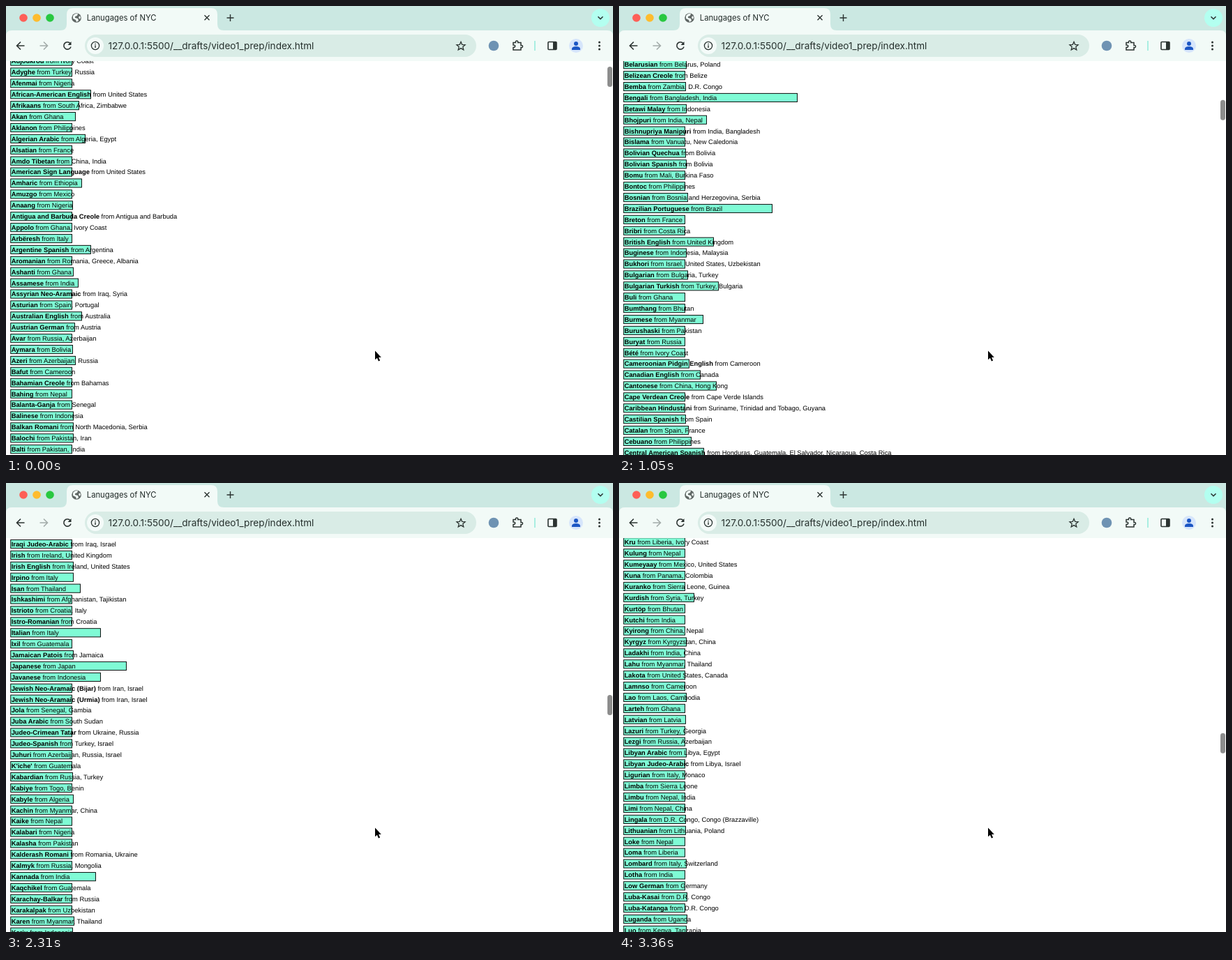
Recreate the animation shown at these times as an HTML page. Size 870x644 px, loop 3.43 s.

```html
<!DOCTYPE html>
<html lang="en">
<head>
<meta charset="utf-8">
<title>Lanugages of NYC</title>
<style>
html, body { margin: 0; width: 100%; height: 100%; overflow: hidden; background: #fff; }
svg { position: absolute; left: 0; top: 0; font-family: Inter, sans-serif; }
#list { font: 10px "Liberation Sans", Arial, sans-serif; text-rendering: geometricPrecision; }
#list rect { fill: #7ffbd5; stroke: #000; }
.line { fill: none; stroke: #2b3331; stroke-width: 1.6; }
</style>
</head>
<body>
<svg width="870" height="644" viewBox="0 0 870 644">
  <g id="list"></g>
  <rect id="thumb" x="862" width="7" height="29" rx="3.5" fill="#8d8d8d"/>
  <path fill="#cbe8e2" d="M0 0H870V44H0z"/>
  <path fill="#f2faf7" d="M0 79V43Q0 35 8 35H78Q87 35 87 26V12Q87 3 96 3H294Q303 3 303 12V26Q303 35 312 35H862Q870 35 870 43V79z"/>
  <circle cx="25" cy="17" r="5.8" fill="#fe5f57"/>
  <circle cx="44" cy="17" r="5.8" fill="#febc2e"/>
  <circle cx="63" cy="17" r="5.8" fill="#28c840"/>
  <!-- tab -->
  <circle cx="101" cy="17" r="6.8" fill="#5f6664"/>
  <path fill="#f2faf7" d="M96 14q3-4 7-3l-1 3-3 1 0 2 4 1 1 3-3 2-1-3-4-2zM105 14l2 2-1 3-2-2z"/>
  <text x="115.8" y="21" font-size="11.25" fill="#202927">Lanugages of NYC</text>
  <path class="line" d="M284.5 13.2l7 7m0-7l-7 7M321.5 12v10m-5-5h10" style="stroke-width:1.4"/>
  <circle cx="852" cy="17" r="13" fill="#b3fff0"/>
  <path class="line" d="M848.5 15.2l3.5 3.5 3.5-3.5"/>
  <!-- toolbar -->
  <path class="line" d="M26.5 57H15.5m5.5-5.5L15.5 57l5.5 5.5"/>
  <path class="line" d="M48.5 57h11m-5.5-5.5l5.5 5.5-5.5 5.5" style="stroke:#a3acaa"/>
  <path class="line" d="M92 53.5a5.2 5.2 0 1 0 1 5"/>
  <path fill="#2b3331" d="M93.5 51v5h-5z"/>
  <rect x="113" y="41" width="561" height="32" rx="16" fill="#d9ece6"/>
  <circle cx="128" cy="57" r="12" fill="#f4fbf9"/>
  <circle class="line" cx="128" cy="57" r="5.6" style="stroke-width:1.3"/>
  <path class="line" d="M128 56.3v3.7m0-6.2v1.5" style="stroke-width:1.4"/>
  <text x="146.5" y="61.7" font-size="13.55" fill="#26302d">127.0.0.1:5500/__drafts/video1_prep/index.html</text>
  <path class="line" d="M652 51.3l1.7 4 4.4.4-3.3 2.9 1 4.3-3.8-2.3-3.8 2.3 1-4.3-3.3-2.9 4.4-.4z" style="stroke-width:1.3"/>
  <circle cx="699" cy="57" r="7.3" fill="#6f93b3"/>
  <path class="line" d="M727 52.5h3.5q-.5-2.5 1.6-2.5t1.6 2.5h4.3v4q2.5-.4 2.5 1.6t-2.5 1.5v3.4h-11v-3.6q2.8 0 2.8-1.8t-2.8-1.7z" style="stroke-width:1.5"/>
  <path fill="#a9eee2" d="M757 50h2v14h-2z"/>
  <rect class="line" x="777" y="51.5" width="12" height="11" rx="1"/>
  <path fill="#2b3331" d="M784 51h5v12h-5z"/>
  <circle cx="817" cy="57" r="10" fill="#d6e5fb"/>
  <circle cx="817" cy="54" r="3" fill="#1b56c4"/>
  <path fill="#1b56c4" d="M811 63v-1.5q0-3.5 6-3.5t6 3.5V63z"/>
  <g fill="#2b3331"><circle cx="850.5" cy="52" r="1.5"/><circle cx="850.5" cy="57" r="1.5"/><circle cx="850.5" cy="62" r="1.5"/></g>
  <!-- pointer -->
  <path d="M529 494.5V507.300l2.900-2.600 2 4.800 2.200-.9-2-4.700h3.700z" stroke="#fff" stroke-width="1.600" paint-order="stroke" stroke-linejoin="round"/>
</svg>
<script>
// language : countries : extra bar length
const rows = `Adjoukrou:Ivory Coast
Adyghe:Turkey, Russia
Afenmai:Nigeria
African-American English:United States:27
Afrikaans:South Africa, Zimbabwe:10
Akan:Ghana:5
Aklanon:Philippines
Algerian Arabic:Algeria, Egypt:19
Alsatian:France
Amdo Tibetan:China, India
American Sign Language:United States
Amharic:Ethiopia:14
Amuzgo:Mexico
Anaang:Nigeria:1
Antigua and Barbuda Creole:Antigua and Barbuda
Appolo:Ghana, Ivory Coast
Arbëresh:Italy
Argentine Spanish:Argentina:27
Aromanian:Romania, Greece, Albania
Ashanti:Ghana:2
Assamese:India:9
Assyrian Neo-Aramaic:Iraq, Syria
Asturian:Spain, Portugal
Australian English:Australia:14
Austrian German:Austria:4
Avar:Russia, Azerbaijan
Aymara:Bolivia:1
Azeri:Azerbaijan, Russia:5
Bafut:Cameroon
Bahamian Creole:Bahamas
Bahing:Nepal
Balanta-Ganja:Senegal
Balinese:Indonesia:2
Balkan Romani:North Macedonia, Serbia:2
Balochi:Pakistan, Iran:2
Balti:Pakistan, India
Bambara:Mali, Ivory Coast:8
Banguingui:Philippines, Malaysia
Banjarese:Indonesia, Malaysia:2
Bantawa:Nepal, India
Baoulé:Ivory Coast:2
Baragaun:Nepal
Barbadian Creole:Barbados
Bartangi:Tajikistan, Afghanistan
Basaa:Cameroon
Basque:Spain, France
Bassa:Liberia, Sierra Leone
Batak:Indonesia:1
Bats:Georgia
Bavarian:Germany, Austria
Bedawi:Sudan, Egypt
Beja:Sudan
Belarusian:Belarus, Poland:2
Belizean Creole:Belize
Bemba:Zambia, D.R. Congo:1
Bengali:Bangladesh, India:161
Betawi Malay:Indonesia:2
Bhojpuri:India, Nepal:31
Bishnupriya Manipuri:India, Bangladesh
Bislama:Vanuatu, New Caledonia
Bolivian Quechua:Bolivia:1
Bolivian Spanish:Bolivia:2
Bomu:Mali, Burkina Faso
Bontoc:Philippines
Bosnian:Bosnia and Herzegovina, Serbia:4
Brazilian Portuguese:Brazil:125
Breton:France
Bribri:Costa Rica
British English:United Kingdom:41
Buginese:Indonesia, Malaysia:2
Bukhori:Israel, United States, Uzbekistan
Bulgarian:Bulgaria, Turkey:4
Bulgarian Turkish:Turkey, Bulgaria:48
Buli:Ghana
Bumthang:Bhutan
Burmese:Myanmar:26
Burushaski:Pakistan
Buryat:Russia
Bété:Ivory Coast
Cameroonian Pidgin English:Cameroon:6
Canadian English:Canada:22
Cantonese:China, Hong Kong:45
Cape Verdean Creole:Cape Verde Islands
Caribbean Hindustani:Suriname, Trinidad and Tobago, Guyana
Castilian Spanish:Spain:1
Catalan:Spain, France:5
Cebuano:Philippines:9
Central American Spanish:Honduras, Guatemala, El Salvador, Nicaragua, Costa Rica:27
Central Kurdish:Iraq, Iran
Chadian Arabic:Chad
Chakma:Bangladesh, India
Chaldean Neo-Aramaic:Iraq
Chamorro:Guam
Chantyal:Nepal
Chatino:Mexico
Chavacano:Philippines
Chechen:Russia
Cherokee:United States
Chichewa:Malawi, Zambia
Chilean Spanish:Chile:5
Chinantec:Mexico
Chittagonian:Bangladesh
Choctaw:United States
Chocho:Mexico
Chuj:Guatemala
Chukchi:Russia
Chuukese:Micronesia
Chuvash:Russia
Cilentan:Italy
Cimbrian:Italy
Colombian Spanish:Colombia:30
Comorian:Comoros
Cornish:United Kingdom
Corsican:France
Costa Rican Spanish:Costa Rica
Cree:Canada
Creek:United States
Crimean Karaim:Ukraine
Crimean Tatar:Ukraine, Turkey, Uzbekistan
Croatian:Croatia, Slovenia:4
Cuban Spanish:Cuba:6
Cuicatec:Mexico
Cypriot Greek:Cyprus, Greece
Czech:Czech Republic, Slovakia:7
Dagaare:Ghana
Dagbani:Ghana
Dangme:Ghana
Danish:Denmark, Sweden:2
Danube Swabian:Hungary, Romania
Darfurian Arabic:Sudan:5
Dari:Afghanistan, Pakistan:4
Denjongke:India
Dhivehi:Maldives, India
Dinka:Sudan, South Sudan
Dolpo:Nepal
Dominican Creole (English):Dominica
Dominican Creole (French):Dominica
Dominican Spanish:Dominican Republic:5
Duala:Cameroon
Dungan:Kyrgyzstan, Kazakhstan
Dutch:Netherlands, Belgium:14
Dyula:Ivory Coast, Burkina Faso:8
Dzongkha:Bhutan, India
Eastern Armenian:Armenia, Russia:2
Ebrié:Ivory Coast
Ecuadorian Kichwa:Ecuador
Ecuadorian Spanish:Ecuador:10
Edo:Nigeria:1
Efik:Nigeria:1
Egyptian Arabic:Egypt:39
Esan:Nigeria
Esperanto:France, Brazil:1
Estonian:Estonia
Ewe:Ghana, Togo:2
Ewondo:Cameroon
Extremaduran:Spain
Fang:Gabon, Cameroon
Fante:Ghana
Faroese:Denmark
Fijian:Fiji
Fiji Hindi:Fiji
Finnish:Finland
Flemish:Belgium
Fon:Benin, Togo
French:France, Canada:60
Frisian:Netherlands
Friulian:Italy
Fulani:Guinea, Senegal:9
Fur:Sudan
Fuzhounese:China:40
Ga:Ghana
Gagauz:Moldova
Galician:Spain
Gallurese:Italy
Gan:China
Garhwali:India
Garifuna:Honduras, Belize, Guatemala
Garo:India, Bangladesh
Gen:Togo, Benin
Georgian:Georgia:5
German:Germany, Austria:30
Ghale:Nepal
Gheg Albanian:Kosovo, Albania
Gikuyu:Kenya
Gilaki:Iran
Gola:Liberia
Gonja:Ghana
Gorani:Kosovo
Gouro:Ivory Coast
Grebo:Liberia
Greek:Greece, Cyprus:30
Greenlandic:Denmark
Grenadian Creole:Grenada
Griko:Italy
Guadeloupean Creole:France
Guarani:Paraguay
Guerrero Nahuatl:Mexico
Gujarati:India:40
Gullah:United States
Gurage:Ethiopia
Gurung:Nepal
Gusii:Kenya
Guyanese Creole:Guyana:20
Gyalrong:China
Hadiyya:Ethiopia
Haitian Creole:Haiti:80
Hakha Chin:Myanmar
Hakka:China, Taiwan:8
Harari:Ethiopia
Hassaniya:Mauritania
Hausa:Nigeria, Niger:4
Hawaiian:United States
Hazaragi:Afghanistan
Hebrew:Israel:50
Herero:Namibia
Hiligaynon:Philippines
Hindi:India:90
Hindko:Pakistan
Hmong:Laos, China
Ho:India
Honduran Spanish:Honduras
Hopi:United States
Huave:Mexico
Hungarian:Hungary, Romania:8
Hunsrik:Brazil
Hutsul:Ukraine
Ibanag:Philippines
Ibibio:Nigeria
Icelandic:Iceland
Igbo:Nigeria:12
Ilocano:Philippines
Indonesian:Indonesia:6
Ingush:Russia
Inuktitut:Canada
Iranian Azeri:Iran
Iraqi Judeo-Arabic:Iraq, Israel
Irish:Ireland, United Kingdom
Irish English:Ireland, United States:2
Irpino:Italy:2
Isan:Thailand:12
Ishkashimi:Afghanistan, Tajikistan
Istrioto:Croatia, Italy
Istro-Romanian:Croatia
Italian:Italy:41
Ixil:Guatemala
Jamaican Patois:Jamaica:2
Japanese:Japan:78
Javanese:Indonesia:41
Jewish Neo-Aramaic (Bijar):Iran, Israel
Jewish Neo-Aramaic (Urmia):Iran, Israel
Jola:Senegal, Gambia
Juba Arabic:South Sudan
Judeo-Crimean Tatar:Ukraine, Russia
Judeo-Spanish:Turkey, Israel
Juhuri:Azerbaijan, Russia, Israel
K'iche':Guatemala
Kabardian:Russia, Turkey:1
Kabiye:Togo, Benin
Kabyle:Algeria:2
Kachin:Myanmar, China
Kaike:Nepal
Kalabari:Nigeria
Kalasha:Pakistan
Kalderash Romani:Romania, Ukraine
Kalmyk:Russia, Mongolia
Kannada:India:34
Kaqchikel:Guatemala
Karachay-Balkar:Russia
Karakalpak:Uzbekistan
Karen:Myanmar, Thailand:3
Kariu:Indonesia:1
Kashmiri:India, Pakistan:3
Kassonke:Mali, Senegal
Kazakh:Kazakhstan, China:5
Khaling:Nepal
Khalkha Mongolian:Mongolia, Russia:1
Kham Magar:Nepal
Kham Tibetan:China, India
Khmer:Cambodia, Vietnam:10
Khowar:Pakistan, India
Kikongo:D.R. Congo, Congo (Brazzaville):3
Kimbundu:Angola:1
Kinaray-a:Philippines
Kinyarwanda:Rwanda, Uganda:6
Kirundi:Burundi:5
Kituba:Congo (Brazzaville):2
Kodava:India
Konkani:India:2
Konyak:India
Korean:South Korea:150
Koya:India
Kpelle:Liberia, Guinea
Krahn:Liberia, Ivory Coast
Krio:Sierra Leone
Kru:Liberia, Ivory Coast
Kulung:Nepal
Kumeyaay:Mexico, United States
Kuna:Panama, Colombia
Kuranko:Sierra Leone, Guinea
Kurdish:Syria, Turkey:13
Kurtöp:Bhutan
Kutchi:India
Kyirong:China, Nepal
Kyrgyz:Kyrgyzstan, China:2
Ladakhi:India, China
Lahu:Myanmar, Thailand
Lakota:United States, Canada
Lamnso:Cameroon
Lao:Laos, Cambodia:2
Larteh:Ghana
Latvian:Latvia:1
Lazuri:Turkey, Georgia
Lezgi:Russia, Azerbaijan
Libyan Arabic:Libya, Egypt:2
Libyan Judeo-Arabic:Libya, Israel
Ligurian:Italy, Monaco
Limba:Sierra Leone
Limbu:Nepal, India
Limi:Nepal, China
Lingala:D.R. Congo, Congo (Brazzaville):1
Lithuanian:Lithuania, Poland:1
Loke:Nepal
Loma:Liberia
Lombard:Italy, Switzerland:2
Lotha:India
Low German:Germany
Luba-Kasai:D.R. Congo:3
Luba-Katanga:D.R. Congo
Luganda:Uganda:3
Luo:Kenya, Tanzania:2`.split("\n");

const PITCH = 17, SCALE = 870 / 930, STEP = 70, STEPS = 49;
const list = document.getElementById("list");
const thumb = document.getElementById("thumb");

list.innerHTML = rows.map((row, i) => {
  const [name, places, extra = 0] = row.split(":");
  const y = i * PITCH, w = (87.7 + +extra) / SCALE;
  return `<rect x="7.2" y="${y}" width="${w}" height="13"/>` +
    `<text x="8.2" y="${y + 10.1}"><tspan font-weight="bold">${name}</tspan> from ${places}</text>`;
}).join("");

// step, scroll distance, speed per step
const keys = [[0, 0, 18], [6, 181.7, 43], [15, 822.3, 82], [26, 1878.5, 141], [33, 3728.8, 83], [39, 4023.5, 58], [48, 4669.8, 70]];

function scrollAt(step) {
  const k = Math.max(1, keys.findIndex(key => key[0] >= step));
  const [t0, y0, v0] = keys[k - 1], [t1, y1, v1] = keys[k];
  const d = t1 - t0, u = (step - t0) / d, w = 1 - u;
  return w * w * ((1 + 2 * u) * y0 + u * d * v0) + u * u * ((3 - 2 * u) * y1 - w * d * v1);
}

function draw(now) {
  const y = scrollAt(Math.floor(now / STEP) % STEPS);
  list.setAttribute("transform", `translate(0 ${73 - y}) scale(${SCALE})`);
  thumb.setAttribute("y", 87 + y / 17.18);
  requestAnimationFrame(draw);
}
draw(0);
</script>
</body>
</html>
```
